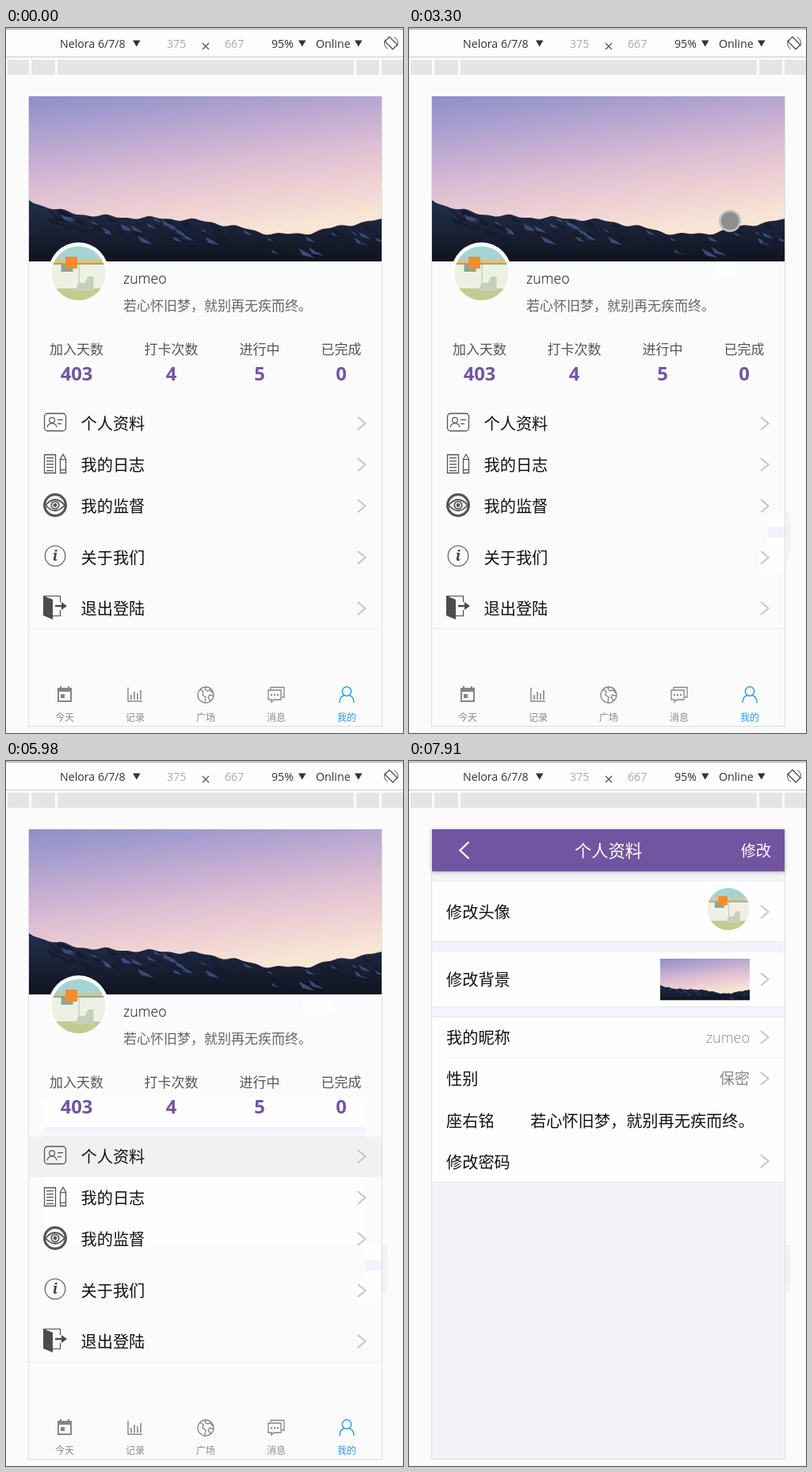
An HTML page with a canvas that plays this animation: 501x888 px, repeating every 8 s.

```html
<!DOCTYPE html>
<html lang="zh-CN">
<head>
<meta charset="utf-8">
<title>个人资料</title>
<style>
html, body { margin: 0; width: 100%; height: 100%; overflow: hidden; background: #fbfbfb; }
canvas { display: block; width: 100%; height: 100%; }
</style>
</head>
<body>
<canvas id="stage"></canvas>
<script>
const W = 501, H = 888, LOOP = 8000;
const PRESS = 5830, OPEN = 6110, STATUS = 6250, READY = 6370;
const NICK = 'zumeo', MOTTO = '若心怀旧梦，就别再无疾而终。';
const FONT = '"Open Sans", "Noto Sans CJK SC", "Noto Sans CJK JP", "Noto Sans CJK", sans-serif';
const BG = '#fbfbfb', PANEL = '#fefefe', PURPLE = '#7255a0', BAND = '#f3f4f9', INK = '#555';

const canvas = document.getElementById('stage');
const ctx = canvas.getContext('2d');
const ratio = window.devicePixelRatio || 1;
canvas.width = W * ratio;
canvas.height = H * ratio;

// Each stroke shows the pointer and moves it in even steps along a bent curve.
const strokes = [
  { show: 120, hide: 1960, start: 686, end: 1400, steps: 5, from: [456, 668], bend: [473, 658], to: [467, 624] },
  { show: 2790, hide: 3700, end: 3570, steps: 6, from: [399, 300], bend: [416, 186], to: [389, 300] },
  { show: 4110, hide: 4820, end: 4420, steps: 2, from: [375, 478], bend: [347, 484], to: [320, 490] },
  { show: 4820, hide: 5520, end: 5240, steps: 3, from: [205, 598], bend: [-142, 520], to: [305, 439] },
  { show: PRESS, hide: 5980, from: [292, 503] },
  { show: 6680, hide: 7610, end: 7480, steps: 6, from: [342, 548], bend: [291, 465], to: [393, 268] },
  { show: 7760, hide: 7910, from: [411, 208] }
];

function place({ from, bend, to, steps }, k) {
  if (!steps) return from;
  const u = k / steps, v = 1 - u;
  return from.map((a, i) => v * v * a + 2 * u * v * bend[i] + u * u * to[i]);
}

function stepAt({ show, start = show, end, steps }, t) {
  if (!steps) return 0;
  return Math.max(0, Math.min(steps, Math.floor((t - start) / ((end - start) / steps))));
}

function box(x, y, w, h, color) {
  ctx.fillStyle = color;
  ctx.fillRect(x, y, w, h);
}

function text(str, x, y, size, color = '#111', align = 'left', weight = 350) {
  ctx.font = `${weight} ${size}px ${FONT}`;
  ctx.textAlign = align;
  ctx.fillStyle = color;
  ctx.fillText(str, x, y);
}

function path(pts, close) {
  ctx.beginPath();
  for (let i = 0; i < pts.length; i += 2) ctx.lineTo(pts[i], pts[i + 1]);
  if (close) ctx.closePath();
}

function line(pts, color = INK, width = 1.3, close = false) {
  path(pts, close);
  ctx.strokeStyle = color;
  ctx.lineWidth = width;
  ctx.stroke();
}

function poly(pts, color) {
  path(pts, true);
  ctx.fillStyle = color;
  ctx.fill();
}

function disc(x, y, r, color) {
  ctx.beginPath();
  ctx.arc(x, y, r, 0, 7);
  ctx.fillStyle = color;
  ctx.fill();
}

function ring(x, y, r, color = INK, width = 1.3, from = 0, to = Math.PI * 2) {
  ctx.beginPath();
  ctx.arc(x, y, r, from, to);
  ctx.strokeStyle = color;
  ctx.lineWidth = width;
  ctx.stroke();
}

function roundBox(x, y, w, h, r, fill, stroke, width = 1) {
  ctx.beginPath();
  ctx.roundRect(x, y, w, h, r);
  ctx.fillStyle = fill;
  ctx.fill();
  ctx.strokeStyle = stroke;
  ctx.lineWidth = width;
  ctx.stroke();
}

function curve(d, color = INK, width = 1.3) {
  ctx.strokeStyle = color;
  ctx.lineWidth = width;
  ctx.stroke(new Path2D(d));
}

function chevron(y) {
  line([444, y - 8, 453.5, y, 444, y + 8], '#c6c6ca', 2);
}

function gradient(x, y, colors) {
  const g = ctx.createLinearGradient(0, 0, x, y);
  colors.forEach((c, i) => g.addColorStop(i / (colors.length - 1), c));
  return g;
}

const rand = i => Math.abs(Math.sin(i * 127.1 + 3) * 43758.5453) % 1;

// A shoulder on the left, a valley right of the middle, and small crags.
function ridge(x) {
  return 154 - 24 * Math.exp(-x / 45) + 20 * Math.exp(-(((x - 325) / 80) ** 2))
    + 1.6 * Math.sin(x / 9) + Math.sin(x / 4.3 + 1);
}

function photo(x, y, w, h) {
  ctx.save();
  ctx.translate(x, y);
  ctx.scale(w / 445, h / 208);
  ctx.beginPath();
  ctx.rect(0, 0, 445, 208);
  ctx.clip();
  box(0, 0, 445, 208, gradient(28, 203, ['#8d8fc7', '#a89ece', '#c5aed2', '#dfc0d3', '#efd0d3', '#f7e5d5']));
  const slope = [445, 208, 0, 208];
  for (let i = 0; i <= 445; i += 5) slope.push(i, ridge(i));
  ctx.save();
  poly(slope, gradient(0, 208, ['#33426c', '#33426c', '#2b385d', '#1d263e', '#10141f']));
  ctx.clip();
  for (let i = 0; i < 90; i++) {
    const a = rand(i) * 445, b = ridge(a) + rand(i + 200) * 22, size = 4 + rand(i + 400) * 8;
    poly([a, b, a + size, b + size * .5, a + size * 1.7, b + size, a + size * .4, b + size * .7],
      i % 3 ? '#151b2c' : '#3b4b78');
  }
  ctx.restore();
  ctx.restore();
}

function avatar(x, y, r) {
  ctx.save();
  ctx.translate(x, y);
  ctx.scale(r / 34, r / 34);
  ctx.beginPath();
  ctx.arc(0, 0, 34, 0, 7);
  ctx.clip();
  box(-34, -34, 68, 68, '#edf0e2');
  box(-34, -34, 68, 17, '#a5d3d3');
  box(-34, -17, 68, 4, '#dfc279');
  box(-34, -13, 68, 2, '#87aaa0');
  box(-22, -12, 15, 10, '#8ba594');
  box(-34, 19, 68, 15, '#c4cb91');
  box(0, -11, 1.3, 31, '#c2ccb8');
  poly([-4, 22, 0, 12, 8, 12, 12, 4, 19, 4, 19, 22], '#c6cfbd');
  box(-16.5, -21, 15, 15, '#f28c2e');
  ctx.restore();
}

function browserBar() {
  box(0, 0, W, 37, '#fdfdfd');
  box(0, 0, W, 1, '#d8d8d8');
  box(0, 1, W, 1, '#a9a9a9');
  box(0, 36, W, 1, '#c9c9c9');
  [['Nelora 6/7/8', 68], ['95%', 335], ['Online', 391]].forEach(([s, x]) => text(s, x, 25, 14.2, '#333', 'left', 400));
  [['375', 203], ['667', 276]].forEach(([s, x]) => text(s, x, 25, 14.2, '#aaa', 'left', 400));
  line([248, 19, 256, 27], '#555', 1.3);
  line([256, 19, 248, 27], '#555', 1.3);
  [160, 369, 440].forEach(x => poly([x, 15.5, x + 9.5, 15.5, x + 4.75, 23.5], '#333'));
  ctx.save();
  ctx.translate(486, 19);
  ctx.rotate(-Math.PI / 4);
  ctx.strokeStyle = '#444';
  ctx.lineWidth = 1.2;
  ctx.strokeRect(-4, -7, 8, 14);
  ctx.restore();
  ring(486, 19, 8.5, '#555', 1, -1.1, .5);
  ring(486, 19, 8.5, '#555', 1, 2.1, 3.7);
  // ruler with gaps
  box(2, 40, W - 2, 19, '#e5e5e5');
  [29, 62, 439, 471].forEach(x => box(x, 40, 3, 19, BG));
}

function frameLines() {
  box(28, 86, 1, 794, '#e0e0e0');
  box(474, 86, 1, 794, '#dedede');
  box(28, 879, 447, 1, '#dedede');
}

// Areas the pointer has left are repainted in slightly cleaner tones.
function repainted(t) {
  ctx.save();
  ctx.beginPath();
  for (const s of strokes) {
    if (s.show > t) break;
    const left = s.hide <= t ? (s.steps || 0) + 1 : stepAt(s, t);
    for (let k = 0; k < left; k++) {
      const [x, y] = place(s, k);
      ctx.rect(Math.round(x) - 14, Math.round(y) - 14, 28, 28);
    }
  }
  if (t >= PRESS) ctx.rect(47, 425, 407, 187);
  ctx.clip();
  box(474, 86, 27, 794, '#f2f2f3');
  box(29, 294, 445, 585, PANEL);
  box(29, 461, 445, 10, BAND);
  box(29, 472, 445, 1, '#f0f0f0');
  box(29, 628, 445, 14, BAND);
  ctx.restore();
}

function rowIcons() {
  // card
  roundBox(48.5, 485.5, 27, 22, 4, 'transparent', INK, 1.3);
  ring(58, 494, 3.4, INK, 1.2);
  curve('M52 503 Q53 498 58 498 Q63 498 64 503', INK, 1.2);
  line([65, 493.5, 72, 493.5], INK, 1.3);
  line([65, 498.5, 70, 498.5], INK, 1.3);
  // journal
  line([48.5, 537.5, 62.5, 537.5, 62.5, 560.5, 48.5, 560.5], INK, 1.3, true);
  for (let y = 541.5; y < 558; y += 4) line([51, y, 60, y], INK, 1.3);
  line([68.5, 543, 72, 537, 75.5, 543, 75.5, 560.5, 68.5, 560.5], INK, 1.3, true);
  line([68.5, 556.5, 75.5, 556.5], INK, 1.2);
  line([68.5, 543.5, 75.5, 543.5], INK, 1.2);
  // eye
  ring(62, 601, 13.4, INK, 3.2);
  curve('M50 601 Q62 587 74 601 Q62 615 50 601 Z', INK, 1.8);
  ring(62, 601, 4.7, INK, 1.8);
  disc(62, 601, 2.4, INK);
  // info
  ring(62, 665, 12.8, INK, 1.1);
  ctx.font = 'italic bold 18px "Noto Serif", "Liberation Serif", serif';
  ctx.textAlign = 'center';
  ctx.fillStyle = '#444';
  ctx.fillText('i', 62, 671);
  // exit
  poly([47, 715, 59, 720, 59, 745, 47, 740], '#4c4c4c');
  line([48, 715.5, 68.5, 715.5, 68.5, 723], '#4c4c4c', 1.2);
  line([59, 740.5, 68.5, 740.5, 68.5, 733], '#4c4c4c', 1.2);
  line([62, 728, 72, 728], '#4c4c4c', 2.4);
  poly([70, 723, 77, 728, 70, 733], '#4c4c4c');
}

function tabs() {
  const gray = '#858585', blue = '#2c9df0';
  ['今天', '记录', '广场', '消息', '我的'].forEach((s, i) =>
    text(s, 74 + i * 89, 873, 12, i < 4 ? '#8a8a8a' : blue, 'center'));
  // calendar
  line([66, 832, 82, 832, 82, 848, 66, 848], gray, 2, true);
  box(65, 831, 18, 5, gray);
  box(68, 829, 2, 3, gray);
  box(78, 829, 2, 3, gray);
  box(69, 839, 5, 5, gray);
  // chart
  line([154, 831, 154, 848, 172, 848], gray, 1.4);
  [6, 10, 8, 12].forEach((h, i) => box(157.2 + i * 4, 846 - h, 1.6, h, gray));
  // globe
  ring(252, 840, 10, gray, 1.3);
  curve('M245 833 L249 836 L248 840 L252 843 L251 849 M253 830 Q249 833 254 835 L258 834 L261 838 M261 841 L257 840 L255 843 L258 847', gray, 1.3);
  // chat
  line([334, 833, 334, 830.5, 351, 830.5, 351, 843, 348, 843], gray, 1.3);
  line([331, 834, 347, 834, 347, 846, 338, 846, 335, 849, 335, 846, 331, 846], gray, 1.3, true);
  [335, 339, 343].forEach(x => box(x - 1, 839, 2, 2, gray));
  // person
  ring(430, 835.5, 5.7, blue, 1.5);
  curve('M421 850 Q421 842 427 840.5 M433 840.5 Q439 842 439 850', blue, 1.5);
}

function profile(t) {
  photo(29, 86, 445, 208);
  if (t >= PRESS) {
    box(29, 473, 445, 50, t >= 5980 ? '#f1f1f3' : BG);
    box(29, 523, 445, 1, '#f0f0f0');
  }
  disc(91.5, 308, 38, '#fdfdfd');
  avatar(91.5, 309, 34);
  text(NICK, 148, 322, 17.8);
  text(MOTTO, 148, 356, 17, '#666');
  [['加入天数', 403, 89], ['打卡次数', 4, 208.5], ['进行中', 5, 320], ['已完成', 0, 423]].forEach(([s, n, x]) => {
    text(s, x, 411, 17, '#555', 'center');
    text(n, x, 444, 23.8, PURPLE, 'center', 700);
  });
  [['个人资料', 498], ['我的日志', 550], ['我的监督', 602], ['关于我们', 667], ['退出登陆', 731]].forEach(([s, y]) => {
    text(s, 94.5, y + 8, 20.2);
    chevron(y);
  });
  rowIcons();
  box(29, 756, 445, 1, '#ededed');
  tabs();
}

function header() {
  ctx.save();
  ctx.shadowColor = 'rgba(0,0,0,.3)';
  ctx.shadowBlur = 5 * ratio;
  ctx.shadowOffsetY = ratio;
  box(29, 86, 445, 53, PURPLE);
  ctx.restore();
  line([75.5, 102, 64.5, 112.5, 75.5, 123], '#fff', 2.4);
  text('个人资料', 251.5, 121, 21.3, '#fff', 'center', 500);
  text('修改', 457, 119.5, 19.2, '#fff', 'right', 400);
}

function detailRows(y) {
  box(29, y, 445, 208, PANEL);
  box(29, y, 445, 1, '#e6e6e8');
  ['我的昵称', '性别', '座右铭', '修改密码'].forEach((s, i) => text(s, 47, y + 34 + i * 52.3, 20.2));
  [26, 78, 182].forEach(dy => chevron(y + dy));
  text(NICK, 430, y + 33, 18, '#8a8a8a', 'right');
  text('保密', 430, y + 85, 19.2, '#8a8a8a', 'right');
  text(MOTTO, 153, y + 139, 20.2);
  box(47, y + 51, 427, 1, '#f0f0f0');
  box(29, y + 208, 445, 1, '#e6e6e8');
}

function filePicker(label, y) {
  text(label, 47, y + 8, 20.2);
  chevron(y);
  box(29, y + 26, 445, 1, '#ececee');
  roundBox(29.5, y + 27, 94, 28, 2, '#efefef', '#767676');
  text('选择文件', 38, y + 49, 19.2);
  text('未选择任何文件', 128, y + 49, 19, '#6c6c6c');
  box(124, y + 56, 350, 1, '#e6e6e8');
}

function loading(t) {
  box(29, 86, 445, 793, '#f3f3f9');
  box(29, 139, 445, 164, PANEL);
  header();
  filePicker('修改头像', 165);
  filePicker('修改背景', 247);
  detailRows(303);
  if (t < STATUS) return;
  roundBox(28.5, 850.5, 147, 29, [0, 5, 0, 0], PANEL, '#e0e0e4');
  text('正在连接...', 35, 871, 14.4, '#8a8a8a');
}

function details() {
  box(29, 86, 445, 793, BAND);
  header();
  [[152, 76, '修改头像', 190], [241, 69, '修改背景', 275]].forEach(([y, h, s, mid]) => {
    box(29, y, 445, h, PANEL);
    box(29, y + h - 1, 445, 1, '#e9e9ec');
    text(s, 47, mid + 8, 20.2);
    chevron(mid);
  });
  avatar(403, 186.5, 26.5);
  photo(317, 249, 113, 52.5);
  detailRows(322);
}

function pointer(t) {
  const s = strokes.find(s => s.show <= t && t < s.hide);
  if (!s) return;
  const [x, y] = place(s, stepAt(s, t));
  disc(x, y, 14, '#c2c2c2');
  disc(x, y, 11.3, '#8e8e8e');
}

function draw(t) {
  ctx.setTransform(ratio, 0, 0, ratio, 0, 0);
  box(0, 0, W, H, BG);
  browserBar();
  repainted(t);
  if (t < OPEN) profile(t);
  else if (t < READY) loading(t);
  else details();
  frameLines();
  pointer(t);
}

const start = performance.now();
function tick() {
  draw((performance.now() - start) % LOOP);
  requestAnimationFrame(tick);
}
tick();
</script>
</body>
</html>
```
